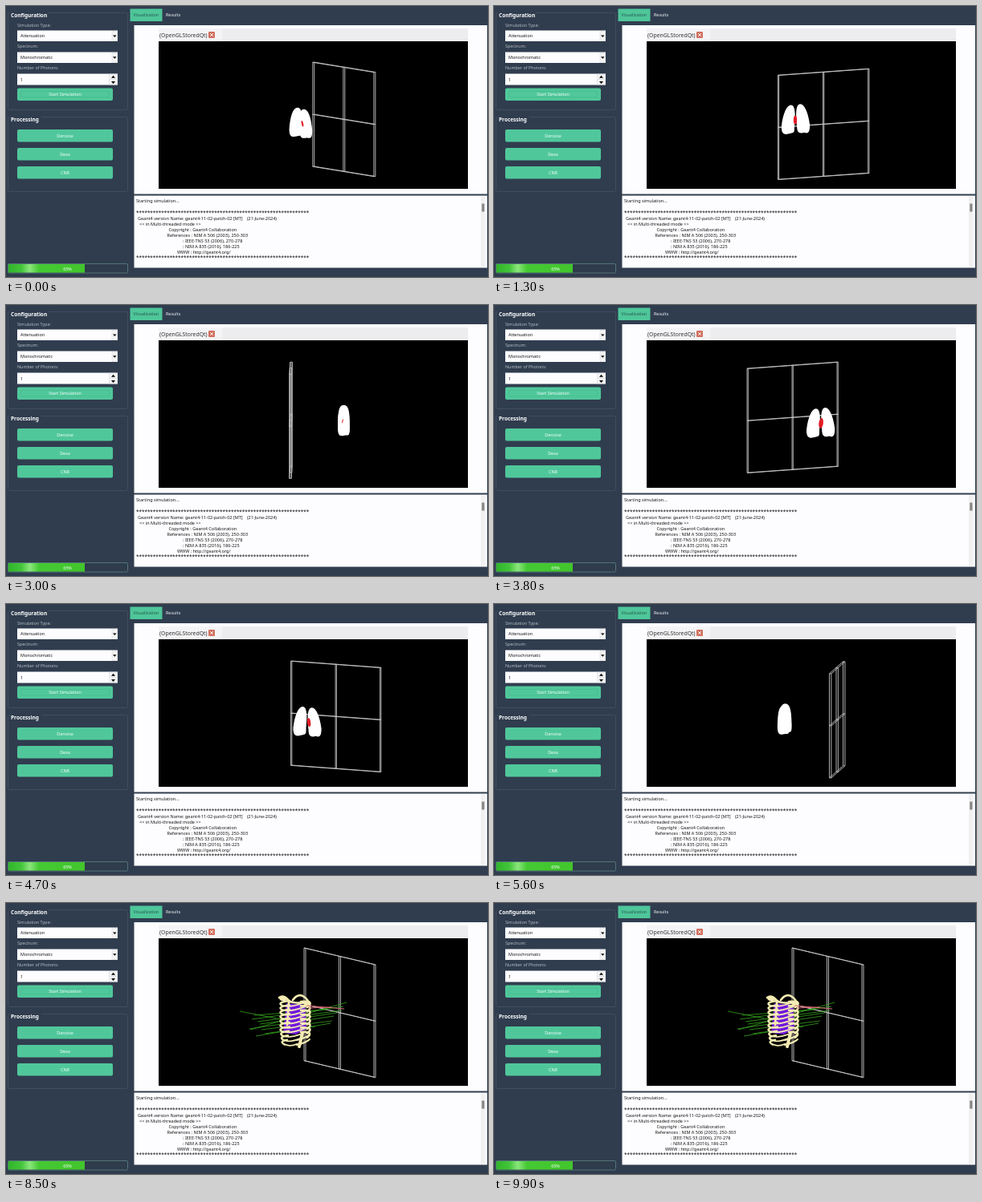
Animation of 600 by 338 pixels, one loop 10 s. Source, as an HTML page with a canvas:

```html
<!DOCTYPE html>
<html lang="en">
<head>
<meta charset="utf-8">
<title>Simulation</title>
<style>
html, body { margin: 0; width: 100%; height: 100%; overflow: hidden; background: #303d4f; }
svg, canvas { position: absolute; left: 0; top: 0; display: block; }
canvas { left: 190px; top: 44px; }
text { font: 5.4px "Noto Sans", "Open Sans", sans-serif; white-space: pre; }
.head { font-size: 6.5px; font-weight: bold; fill: #fff; }
.label { fill: #b4bbc4; }
.dark { fill: #161616; }
.log text { font-size: 5.5px; }
.log .stars { font-size: 6.3px; }
.mid { text-anchor: middle; fill: #f4fffa; }
.group { fill: none; stroke: #414e60; }
.field { fill: #fdfdff; }
.button { fill: #50c79b; }
</style>
</head>
<body>
<svg width="600" height="338" viewBox="0 0 600 338">
  <defs>
    <linearGradient id="bar">
      <stop offset="0" stop-color="#31b52c"/>
      <stop offset=".17" stop-color="#43c43a"/>
      <stop offset=".28" stop-color="#8be67c"/>
      <stop offset=".4" stop-color="#45c934"/>
      <stop offset="1" stop-color="#42c52c"/>
    </linearGradient>
  </defs>
  <rect width="600" height="338" fill="#303d4f"/>

  <rect class="group" x="2.5" y="8.5" width="149" height="121" rx="2"/>
  <rect class="group" x="2.5" y="138.5" width="149" height="93" rx="2"/>
  <path d="M5 8.5H52M5 138.5H44" stroke="#303d4f" stroke-width="2"/>
  <text class="head" x="6" y="14">Configuration</text>
  <text class="head" x="6" y="144">Processing</text>

  <text class="label" x="14" y="25.5">Simulation Type:</text>
  <text class="label" x="14" y="52">Spectrum:</text>
  <text class="label" x="14" y="79">Number of Photons:</text>
  <path class="field" d="M14 30.5h125v13.5H14zM14 57.500h125v13.500H14zM14 84.500h125v14H14z"/>
  <path d="M132 31.500h6.500v12h-6.500zM132 58.500h6.500v12h-6.500zM128.500 85h10v13h-10zM128.500 91.500h10" fill="#f4f4f4" stroke="#d4d6da" stroke-width=".5"/>
  <path d="M133 36.500h4.500l-2.250 2.500zM133 63.200h4.500l-2.250 2.500zM131 89.700h5l-2.500-3zM131 94h5l-2.500 3z"/>
  <text class="dark" x="18" y="39.300">Attenuation</text>
  <text class="dark" x="18" y="66">Monochromatic</text>
  <text class="dark" x="18" y="93.700">1</text>

  <g class="button">
    <rect x="14" y="102.500" width="119" height="15.500" rx="2"/>
    <rect x="14" y="154" width="119" height="15.500" rx="2"/>
    <rect x="14" y="177" width="119" height="15.500" rx="2"/>
    <rect x="14" y="200" width="119" height="15.500" rx="2"/>
  </g>
  <rect x="18.500" y="106.500" width="110" height="7" fill="none" stroke="#3ea984" stroke-width=".6" stroke-dasharray="1"/>
  <text class="mid" x="73.500" y="112">Start Simulation</text>
  <text class="mid" x="73.500" y="163.800">Denoise</text>
  <text class="mid" x="73.500" y="186.800">Dexa</text>
  <text class="mid" x="73.500" y="209.800">CNR</text>

  <rect x="2.5" y="321.500" width="149" height="11.500" rx="1.500" fill="#2e3c4b" stroke="#557578"/>
  <rect x="3" y="322" width="95" height="10.500" fill="url(#bar)"/>
  <text class="mid" x="76.500" y="329.500">65%</text>

  <rect x="154.500" y="3.500" width="40" height="15.500" fill="#4fc69a"/>
  <text x="158.500" y="13.300" fill="#24594d">Visualization</text>
  <text x="199" y="13.300" fill="#f2f4f6">Results</text>

  <rect x="159.500" y="24" width="439.500" height="210.500" fill="#fdfdff"/>
  <rect x="190" y="28" width="385" height="16" fill="#ededef"/>
  <rect x="190" y="28" width="79" height="16" fill="#f4f4f6"/>
  <text x="191" y="38.700" fill="#333" style="font-size:6.900px">(OpenGLStoredQt)</text>
  <rect x="252" y="32" width="8" height="8" rx="1" fill="#d1705f"/>
  <path d="M254.300 34.300l3.400 3.400m0-3.400l-3.400 3.400" stroke="#fff"/>

  <rect x="159.500" y="236.500" width="439.500" height="90" fill="#fdfdff"/>
  <rect x="591" y="237.500" width="5.500" height="88" fill="#f0f0f0"/>
  <rect x="592.300" y="246.500" width="3.200" height="10" fill="#858585"/>
  <g class="dark log">
    <text x="162" y="245.300">Starting simulation...</text>
    <text class="stars" x="162" y="259.500"></text>
    <text x="164" y="266.500">Geant4 version Name: geant4-11-02-patch-02 [MT]</text>
    <text x="337" y="266.500" text-anchor="end">(21-June-2024)</text>
    <text x="166" y="273.500">&lt;&lt; in Multi-threaded mode &gt;&gt;</text>
    <text x="202.500" y="280.500">Copyright : Geant4 Collaboration</text>
    <text x="200.500" y="287.500">References : NIM A 506 (2003), 250-303</text>
    <text x="220" y="294.500">: IEEE-TNS 53 (2006), 270-278</text>
    <text x="220" y="301.500">: NIM A 835 (2016), 186-225</text>
    <text x="213" y="308.500">WWW : http://geant4.org/</text>
    <text class="stars" x="162" y="315.500"></text>
  </g>
</svg>
<canvas width="385" height="184"></canvas>
<script>
const LOOP = 10000, STEP = 100, CUT = 6000;
const TILT = 0.115, HALF_W = 66, HALF_H = 65;
const BONE = '#f4ebb2';
const ctx = document.querySelector('canvas').getContext('2d');
for (const row of document.querySelectorAll('.stars')) row.textContent = '*'.repeat(62);

function line(x1, y1, x2, y2) {
  ctx.beginPath();
  ctx.moveTo(x1, y1);
  ctx.lineTo(x2, y2);
  ctx.stroke();
}

function curve(x1, y1, cx, cy, x2, y2) {
  ctx.beginPath();
  ctx.moveTo(x1, y1);
  ctx.quadraticCurveTo(cx, cy, x2, y2);
  ctx.stroke();
}

function ellipse(x, y, rx, ry, turn = 0) {
  ctx.beginPath();
  ctx.ellipse(x, y, rx, ry, turn, 0, 7);
  ctx.fill();
}

// Two by two cells; point(u, v, w) maps panel coordinates to the screen.
function detector(point) {
  ctx.strokeStyle = '#c6c6c6';
  ctx.lineWidth = 0.9;
  const join = (a, b) => line(...point(...a), ...point(...b));
  for (const k of [-1, 0, 1]) {
    for (const w of [-1, 1]) {
      join([k, -1, w], [k, 1, w]);
      join([-1, k, w], [1, k, w]);
    }
    for (const v of [-1, 0, 1]) join([k, v, -1], [k, v, 1]);
  }
}

// Lean is -1 to 1: which way the tip points, 0 seen from the side.
function lobe(x, y, lean) {
  const half = 7.3 + 0.9 * Math.abs(lean), tip = x + lean * 3.5;
  const round = 7 - 2 * Math.abs(lean);
  ctx.beginPath();
  ctx.moveTo(tip, y - 18);
  ctx.bezierCurveTo(tip + round, y - 18, x + half + lean, y - 6, x + half - lean, y + 8);
  ctx.bezierCurveTo(x + half - lean, y + 17, x + 7, y + 18 - lean * 2, x + 2, y + 17.5);
  ctx.bezierCurveTo(x - 4, y + 19, x - half - lean, y + 19 + lean, x - half - lean, y + 9);
  ctx.bezierCurveTo(x - half + lean, y - 7, tip - round, y - 18, tip, y - 18);
  ctx.fill();
}

function lungScene(t) {
  const a = (125.2 - 0.0719 * t) * Math.PI / 180;
  const s = Math.sin(a), c = Math.cos(a);
  const place = (u, w) => [391 + u * c + w * s, 143.8 + (w * c - u * s) * TILT];
  detector((u, v, w) => {
    const [x, y] = place(u * HALF_W, 36.5 + w * 1.2);
    return [x, y + v * HALF_H];
  });
  ctx.fillStyle = '#fff';
  for (const side of [-1, 1]) lobe(...place(side * 10.3, -29.5), -side * c);
  const size = 6 * Math.abs(c) - 0.2 - 1.2 * s;
  if (size > 0.3) {
    const [x, y] = place(-1.5, -28);
    ctx.fillStyle = '#e01c26';
    ellipse(x, y + 1, size / 2, 2 + size * 0.8, c < 0 ? 0.25 * -s : 0);
  }
}

const rays = [
  [291, 135, 372, 151], [304, 158, 424, 124], [311, 166, 404, 150],
  [306, 145, 420, 129], [313, 148, 418, 134], [303, 157, 408, 141],
  [309, 140, 400, 133], [318, 158, 406, 147], [322, 163, 385, 154],
  [316, 151, 412, 137]
];

function ribs() {
  ctx.fillStyle = '#7219dc';
  ctx.beginPath();
  ctx.moveTo(349, 125);
  ctx.lineTo(372, 127);
  ctx.lineTo(374, 157);
  ctx.lineTo(361, 164);
  ctx.lineTo(345, 162);
  ctx.fill();

  ctx.strokeStyle = BONE;
  ctx.lineCap = 'round';
  for (let i = 0; i < 10; i++) {
    const y = 122 + i * 5.4, low = Math.max(0, i - 6);
    ctx.lineWidth = 2.4;
    curve(353 - low, y, 336 + low, y + 2, 344 + low, y + 6);
    ctx.lineWidth = 1.8;
    curve(345 + low, y + 6, 353, y + 9, 372 - low * 3, y + 2 + low);
    if (i < 8) {
      ctx.lineWidth = 2.6;
      curve(367, y + 1, 385 - low, y, 375, y + 8);
    }
  }
  ctx.lineWidth = 2.6;
  line(352, 124, 350, 152);
  curve(340, 118, 347, 114, 353, 123);
  curve(351, 122, 360, 126, 376, 124);
  curve(357, 121, 364, 112, 371, 117);
  curve(371, 117, 376, 120, 378, 127);
  ctx.lineWidth = 4;
  line(369, 162, 365, 179);
  ctx.lineWidth = 2;
  for (const y of [167, 173]) curve(362, y + 4, 374, y + 1, 378, y - 3);
  ctx.fillStyle = BONE;
  ellipse(345, 119, 5, 3.5, 0.2);
  ellipse(375, 125, 4.5, 3.5);
  ctx.lineCap = 'butt';
}

function ribScene() {
  detector((u, v, w) => [415.5 + u * 43.5 + w, 136.8 + u * 10.3 + v * 70.3 + w * 0.2]);
  ctx.lineWidth = 0.8;
  ctx.strokeStyle = '#37a51f';
  for (const ray of rays) line(...ray);
  ribs();
  ctx.lineWidth = 1;
  ctx.strokeStyle = '#d96a78';
  line(374, 128, 421, 132);
  line(376, 131, 405, 130);
}

function draw(now) {
  const t = Math.floor(now % LOOP / STEP) * STEP;
  ctx.setTransform(1, 0, 0, 1, 0, 0);
  ctx.fillStyle = '#000';
  ctx.fillRect(0, 0, 385, 184);
  ctx.translate(-190, -44);
  if (t < CUT) lungScene(t);
  else ribScene();
}

let start;
function tick(now) {
  start ??= now;
  draw(now - start);
  requestAnimationFrame(tick);
}
draw(0);
requestAnimationFrame(tick);
</script>
</body>
</html>
```
